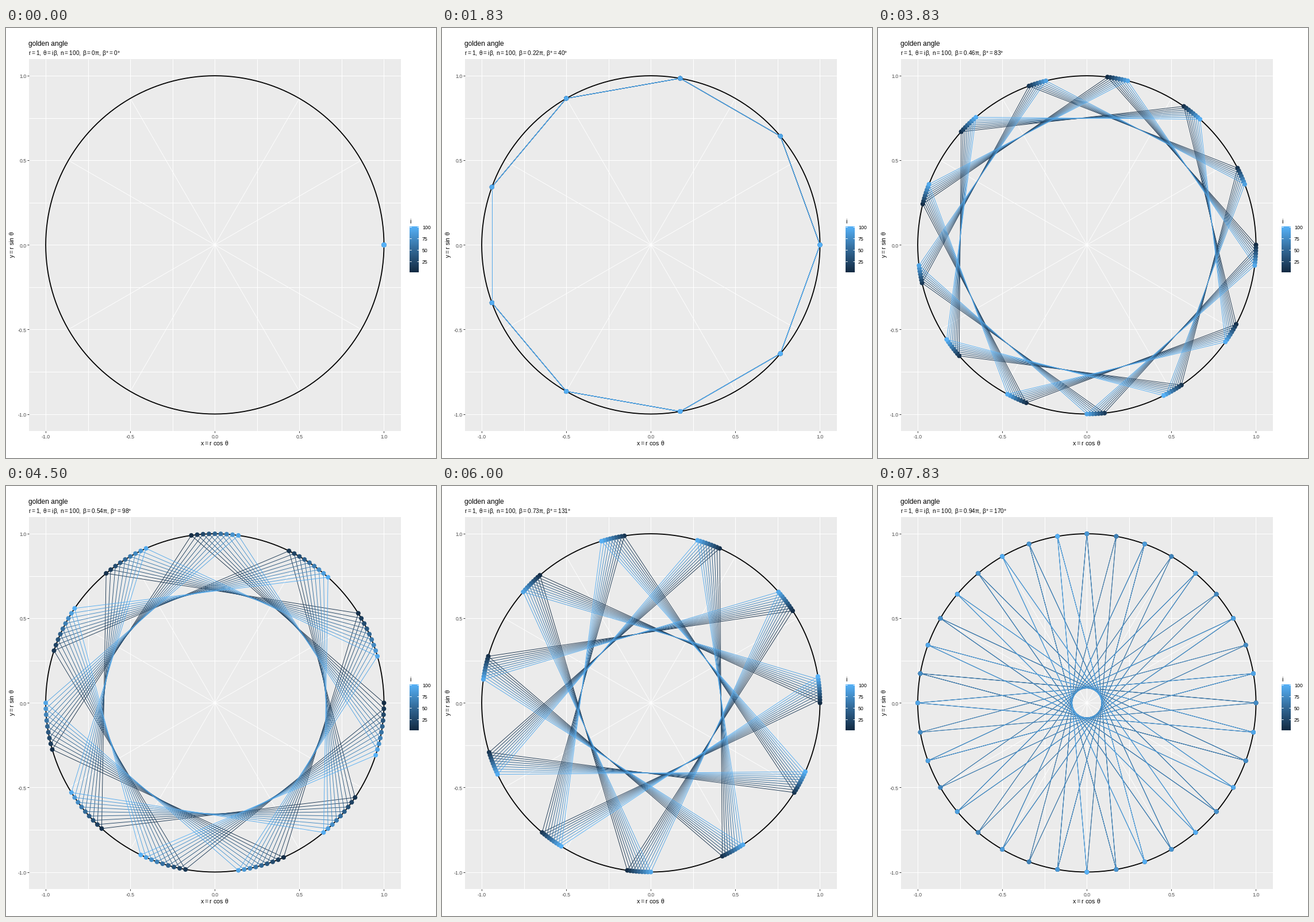
A matplotlib script that plays this animation: 748x748 px, repeating every 8 s.

```python
import numpy as np
import matplotlib.pyplot as plt
from matplotlib.animation import FuncAnimation
from matplotlib.collections import LineCollection
from matplotlib.colors import LinearSegmentedColormap
from matplotlib.patches import Rectangle

SIZE, DPI = 748, 100
STEPS, LOOP_MS, TICK_MS = 48, 8000, 50
N = 100
CX, CY, R = 363.3, 377.3, 294.2
PT = 72 / DPI  # points per pixel

plt.rcParams.update({
    "font.family": "Liberation Sans",
    "mathtext.fontset": "custom",
    "mathtext.rm": "Liberation Sans",
    "mathtext.default": "rm",
})
blues = LinearSegmentedColormap.from_list(
    "blues", ["#132B43", "#336A98", "#56B1F7"])

fig = plt.figure(figsize=(SIZE / DPI, SIZE / DPI), dpi=DPI, facecolor="white")
ax = fig.add_axes([0, 0, 1, 1])
ax.axis("off")


def px(x):
    return CX + R * np.asarray(x)


def py(y):
    return CY - R * np.asarray(y)


def segments(segs, color, z, width=1):
    lines = LineCollection(segs, colors=color, linewidths=width * PT, zorder=z)
    return ax.add_collection(lines)


def label(x, y, text, size, color="black", **kw):
    return ax.text(x, y, text, fontsize=size * PT, color=color, **kw)


# Panel and grid
half = 1.1 * R
left, right, top, bottom = CX - half, CX + half, CY - half, CY + half
ax.add_patch(Rectangle((left, top), 2 * half, 2 * half, fc="#EBEBEB",
                       lw=0, zorder=0))
grid = []
for v in np.linspace(-1, 1, 9):
    grid += [[(px(v), top), (px(v), bottom)], [(left, py(v)), (right, py(v))]]
segments(grid, "white", 1)

spokes = np.radians(np.arange(0, 360, 30))
segments([[(CX, CY), (px(np.cos(a)), py(np.sin(a)))] for a in spokes],
         "white", 2, 0.9)

# Unit circle
turn = np.linspace(0, 2 * np.pi, 361)
ax.plot(px(np.cos(turn)), py(np.sin(turn)), color="black", lw=1.8 * PT,
        zorder=3)

# Axes
ticks = []
for v in np.linspace(-1, 1, 5):
    ticks += [[(px(v), bottom), (px(v), bottom + 3)],
              [(left - 3, py(v)), (left, py(v))]]
    label(px(v), 710.5, f"{v:.1f}", 8.8, "#4D4D4D",
          ha="center", va="center_baseline")
    label(35.5, py(v) + 0.7, f"{v:.1f}", 8.8, "#4D4D4D",
          ha="right", va="center_baseline")
segments(ticks, "#333333", 3)

label(39.3, 31, "golden angle", 12)
subtitle = label(39.3, 47, "", 10.1)
label(CX, 726.5, r"$x=r\ cos\ \theta$", 10.6, ha="center", va="baseline")
label(11, CY - 0.8, r"$y=r\ sin\ \theta$", 10.5, rotation=90,
      ha="center", va="center")

# Colour bar
BAR_X, BAR_Y, BAR_W, BAR_H = 702, 345, 16, 80
ax.imshow(np.linspace(1, 0, BAR_H)[:, None], cmap=blues, aspect="auto",
          extent=(BAR_X, BAR_X + BAR_W, BAR_Y + BAR_H, BAR_Y),
          interpolation="nearest", zorder=3)
ax.set(xlim=(0, SIZE), ylim=(SIZE, 0))
label(BAR_X, 339.5, "i", 10.8)
marks = []
for v in (25, 50, 75, 100):
    y = BAR_Y + 0.5 + BAR_H * (N - v) / (N - 1)
    marks += [[(BAR_X, y), (BAR_X + 3, y)],
              [(BAR_X + BAR_W - 3, y), (BAR_X + BAR_W, y)]]
    label(724, y + 0.7, str(v), 8.8, va="center_baseline")
segments(marks, "white", 4)

# Moving chords and points
index = np.arange(N)
shades = blues(index / (N - 1))
chords = segments([], shades[:-1], 5, 0.9)
dots = ax.scatter(np.full(N, CX), np.full(N, CY), s=(8 * PT) ** 2, c=shades,
                  linewidths=0, zorder=6)


def draw(tick):
    # The pose is held for a sixth of a second, then jumps
    step = min((tick + 1) * TICK_MS * STEPS // LOOP_MS, STEPS - 1)
    deg = round(step * 359 / 99)
    theta = np.radians(index * deg % 360)
    pts = np.column_stack([px(np.cos(theta)), py(np.sin(theta))])
    chords.set_segments(np.stack([pts[:-1], pts[1:]], axis=1))
    dots.set_offsets(pts)
    subtitle.set_text(
        rf"$r=1,\,\theta=i\beta,\,n={N},\,"
        rf"\beta={round(deg / 180, 2):g}\pi,\,\beta°={deg}°$")
    return chords, dots, subtitle


anim = FuncAnimation(fig, draw, frames=LOOP_MS // TICK_MS, interval=TICK_MS,
                     repeat=True, repeat_delay=0, blit=False)
plt.show()
```
